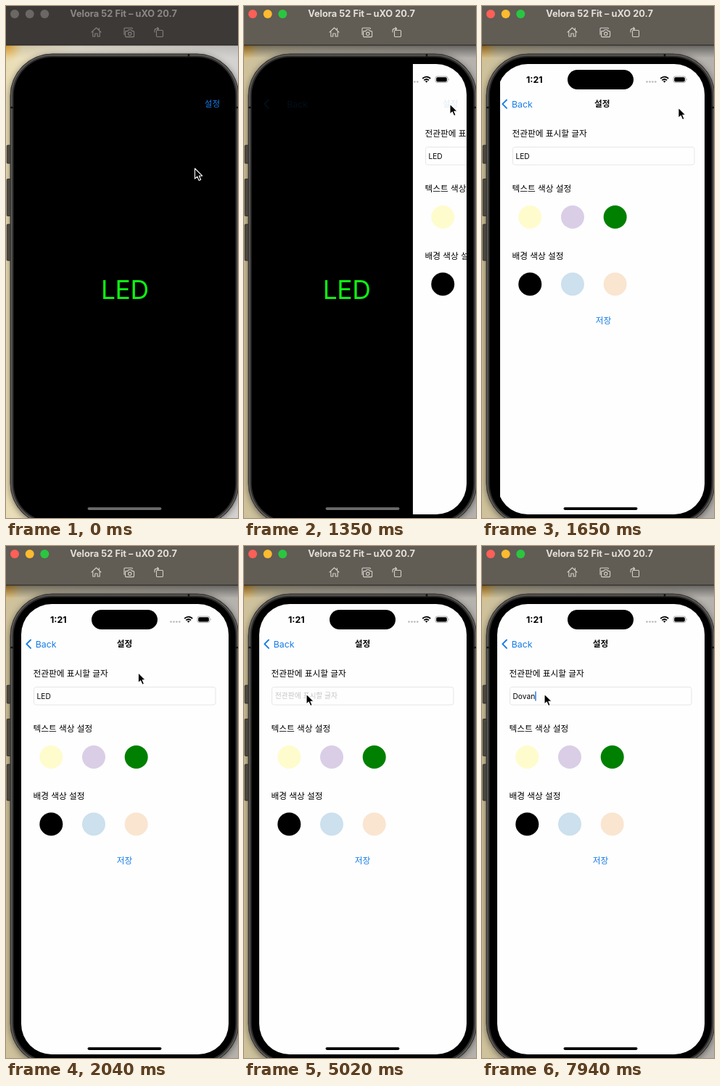
An HTML page that plays this animation: 320 px wide and 706 px high, repeating every 8 s.

```html
<!DOCTYPE html>
<html lang="ko">
<head>
<meta charset="utf-8">
<title>LED board</title>
<style>
  html, body { margin: 0; width: 100%; height: 100%; overflow: hidden; background: #000; }
  svg { display: block; width: 320px; height: 706px; }
  text { font-family: Inter, "Noto Sans CJK KR", "Noto Sans CJK", sans-serif; }
  .ko { font: 11.7px "Noto Sans CJK KR", "Noto Sans CJK", sans-serif; }
  .mid { text-anchor: middle; }
  .blue { fill: #147be6; }
</style>
</head>
<body>
<svg viewBox="0 0 320 706">
  <defs>
    <linearGradient id="idleWall"><stop stop-color="#e9ddb4"/><stop offset=".3" stop-color="#ece6d6"/><stop offset="1" stop-color="#d3d2d0"/></linearGradient>
    <linearGradient id="liveWall"><stop stop-color="#cfc29a"/><stop offset=".3" stop-color="#c4bdab"/><stop offset="1" stop-color="#b5b2ae"/></linearGradient>
    <radialGradient id="corner"><stop stop-color="#f0a52c"/><stop offset="1" stop-color="#f0c060" stop-opacity="0"/></radialGradient>
    <linearGradient id="shade" x2="0" y2="1"><stop/><stop offset="1" stop-opacity="0"/></linearGradient>
    <filter id="soft" x="-10%" y="-10%" width="120%" height="120%"><feGaussianBlur stdDeviation="5"/></filter>
    <clipPath id="screen"><rect x="21" y="80" width="286" height="621" rx="42"/></clipPath>
  </defs>

  <rect id="wall" y="54" width="320" height="652"/>
  <circle cy="54" r="24" fill="url(#corner)"/>
  <rect x="6" y="68" width="315" height="650" rx="58" filter="url(#soft)" opacity=".5"/>
  <rect id="barShade" y="54" width="320" height="18" fill="url(#shade)"/>

  <g id="bar">
    <rect id="barFill" width="320" height="54"/>
    <rect y="53.5" width="320" height="1" fill="#24211f"/>
    <g id="lights"><circle cx="12" cy="11" r="6"/><circle cx="32.7" cy="11" r="6"/><circle cx="53.3" cy="11" r="6"/></g>
    <text id="title" class="mid" x="162" y="15.4" font-size="12.8" font-weight="700">Velora 52 Fit – uXO 20.7</text>
    <g id="tools" fill="none" stroke-width="1.1" stroke-linejoin="round" stroke-linecap="round">
      <path d="M118 36.2 124.5 30l6.5 6.2M119.8 35v7h3v-4h3.4v4h3v-7M128.4 33.2v-2.6"/>
      <path d="M163 39.5v-8.3q0-1 1-1h9.5q1 0 1 1M165.5 34.6h2.4l1.2-1.8h3.6l1.2 1.8h1.7q1 0 1 1v6q0 1-1 1h-10q-1 0-1-1v-6q0-1 .9-1z"/><circle cx="170.8" cy="38.3" r="2.2"/>
      <rect x="207.5" y="33.5" width="9" height="9" rx="1.2"/><path d="M205 36v-2q0-2.6 2.6-2.6h3M208.8 29.5 210.7 31.4 208.8 33.3"/>
    </g>
  </g>

  <g fill="#4b4740" stroke="#25231f" stroke-width=".8">
    <rect x="1.2" y="192" width="6" height="25" rx="1"/>
    <rect x="1.2" y="238.5" width="6" height="51" rx="1"/>
    <rect x="1.2" y="301" width="6" height="50" rx="1"/>
  </g>
  <rect x="6" y="66" width="315" height="650" rx="58" fill="#2f2e2d" stroke="#3a3836"/>
  <rect x="7.7" y="67.7" width="311.6" height="646.6" rx="56.3" fill="none" stroke="#605e5b" stroke-width="1.6"/>
  <rect x="10.5" y="70.5" width="306" height="641" rx="53.5"/>
  <path d="M252 66v4M6 140h4M317 140h4" stroke="#151515" stroke-width="2.5"/>

  <g clip-path="url(#screen)">
    <rect x="21" y="80" width="286" height="621"/>
    <text id="led" class="mid" x="163.8" y="403.5" font-size="35.5" letter-spacing="-.5" fill="#0df511">LED</text>
    <g id="page">
      <rect x="21" y="80" width="290" height="621" fill="#fefefe"/>
      <text class="ko" x="37.5" y="180.2">전관판에 표시할 글자</text>
      <rect x="38.5" y="194.5" width="250.5" height="24.5" rx="3" fill="#fefefe" stroke="#e6e6ea"/>
      <text id="hint" class="ko" x="42.8" y="210.4" style="font-size:9.75px" fill="#c4c4c7">전관판에 표시할 글자</text>
      <text id="entry" x="42.5" y="210.7" font-size="10.2"></text>
      <rect id="caret" y="200.5" width="1.5" height="13" fill="#2f7fe6"/>
      <text class="ko" x="37.5" y="256.2">텍스트 색상 설정</text>
      <text class="ko" x="37.5" y="348.7">배경 색상 설정</text>
      <g id="swatches"></g>
      <text class="ko mid blue" x="163.5" y="438.2">저장</text>
    </g>

    <text id="open" class="ko mid blue" x="284.5" y="139.2">설정</text>
    <text id="heading" class="ko mid" y="139.2" style="font-weight:700">설정</text>
    <path id="chevron" d="M34 129.5 28.3 135.2 34 140.9" fill="none" stroke="#147be6" stroke-width="1.9" stroke-linecap="round" stroke-linejoin="round"/>
    <text id="back" class="blue" y="139.6" font-size="12.3">Back</text>

    <text x="61" y="105.6" font-size="12.3" font-weight="700">1:21</text>
    <rect x="118" y="88" width="91" height="27" rx="13.5"/>
    <g fill-opacity=".28"><circle cx="227.5" cy="104.5" r="1.3"/><circle cx="231.5" cy="104.5" r="1.3"/><circle cx="235.4" cy="104.5" r="1.3"/><circle cx="239.3" cy="104.5" r="1.3"/></g>
    <path d="M246.2 100q5.5-4.8 11 0M248.3 102.4q3.4-2.8 6.8 0" fill="none" stroke="#000" stroke-width="1.7"/>
    <path d="M249.9 103.7q1.8-1.2 3.6 0l-1.8 2z"/>
    <rect x="264" y="97" width="17" height="8.6" rx="2.7" fill="none" stroke="#000" stroke-opacity=".4" stroke-width=".8"/>
    <rect x="265.2" y="98.2" width="14.6" height="6.2" rx="1.7"/>
    <path d="M282.2 99.8q1.4 1.5 0 3z" fill-opacity=".45"/>
    <rect id="home" x="112.5" y="691.3" width="102" height="3.6" rx="1.8"/>
  </g>

  <path id="cursor" d="M0 0V14.2L3.3 11.2 5.7 16.6 8.2 15.5 5.9 10.2H10.2Z" stroke="#fff" stroke-width="1.1" stroke-linejoin="round"/>
</svg>

<script>
const LOOP = 8000;
const $ = id => document.getElementById(id);
const set = (id, attrs) => { for (const k in attrs) $(id).setAttribute(k, attrs[k]); };
const clamp = v => Math.min(1, Math.max(0, v));
const smooth = v => v * v * (3 - 2 * v);
const linear = v => v;

// Keys are [time, ...values]
function track(keys, t, ease = linear) {
  const i = keys.findIndex(k => k[0] > t);
  if (i === 0) return keys[0].slice(1);
  if (i < 0) return keys[keys.length - 1].slice(1);
  const a = keys[i - 1], b = keys[i];
  const f = ease((t - a[0]) / (b[0] - a[0]));
  return a.slice(1).map((v, j) => v + (b[j + 1] - v) * f);
}

const pointer = [[30, 260.5, 224], [830, 284, 135], [1530, 284, 135], [2070, 181.5, 175], [2090, 181.5, 175], [2850, 86, 204]];
const blink = [[2940, 0], [2980, 1], [3420, 1], [3580, 0], [3930, 0], [3940, 1], [4880, 1], [5015, 0],
  [5210, 0], [5290, 1], [5680, 1], [5900, 0], [6145, 0], [6150, 1]];
const typed = [[0, "LED"], [3940, "LE"], [4000, "L"], [4190, ""], [6150, "D"], [6700, "Do"], [7190, "Dov"], [7440, "Dova"], [7850, "Dovan"]];

// Critically damped slide of the pushed page
function push(t) {
  const x = 17.6 * Math.max(0, t - 1295) / 1000;
  const p = 1 - (1 + x) * Math.exp(-x);
  return p > .998 ? 1 : p;
}

function drawWindow(live) {
  set("wall", { fill: `url(#${live ? "liveWall" : "idleWall"})` });
  set("barShade", { opacity: live ? .45 : .12 });
  set("barFill", { fill: live ? "#615c54" : "#3d3937" });
  set("title", { fill: live ? "#e3e0da" : "#8b8885" });
  set("tools", { stroke: live ? "#d3d0ca" : "#83807d" });
  const colors = live ? ["#fe5f57", "#febb2e", "#29c740"] : Array(3).fill("#6a6765");
  [...$("lights").children].forEach((c, i) => c.setAttribute("fill", colors[i]));
}

function drawPush(t) {
  const p = push(t), rest = 1 - p;
  set("page", { transform: `translate(${286 * rest})` });
  set("led", { transform: `translate(${-86 * p})` });
  set("heading", { x: 163.5 + 164 * rest, opacity: p ** 3 });
  set("back", { x: 40.7 + 25 * rest, opacity: p ** 1.6 });
  set("chevron", { opacity: p ** 1.6 });
  set("open", { opacity: 1 - .9 * clamp((t - 1250) / 90) - .1 * clamp((t - 1350) / 60) });
  set("home", { fill: t < 1420 ? "#6b6b6b" : "#000" });
}

function drawField(t) {
  const word = typed.filter(k => k[0] <= t).pop()[1];
  $("entry").textContent = word;
  set("hint", { opacity: word ? 0 : 1 });
  const width = word ? $("entry").getComputedTextLength() : 0;
  set("caret", { x: 42.5 + width, opacity: track(blink, t)[0] });
}

function draw(t) {
  drawWindow(t >= 850);
  drawPush(t);
  drawField(t);
  set("cursor", { transform: `translate(${track(pointer, t, smooth)})` });
}

const rows = [[291, "#fefccd", "#dacee7", "#008000"], [383.5, "#000", "#cce0ed", "#fae5d0"]];
$("swatches").innerHTML = rows.map(([y, ...fills]) =>
  fills.map((f, i) => `<circle cx="${62.3 + 58.7 * i}" cy="${y}" r="16" fill="${f}"/>`).join("")).join("");

function frame(now) {
  draw(now % LOOP);
  requestAnimationFrame(frame);
}
draw(0);
requestAnimationFrame(frame);
</script>
</body>
</html>
```
